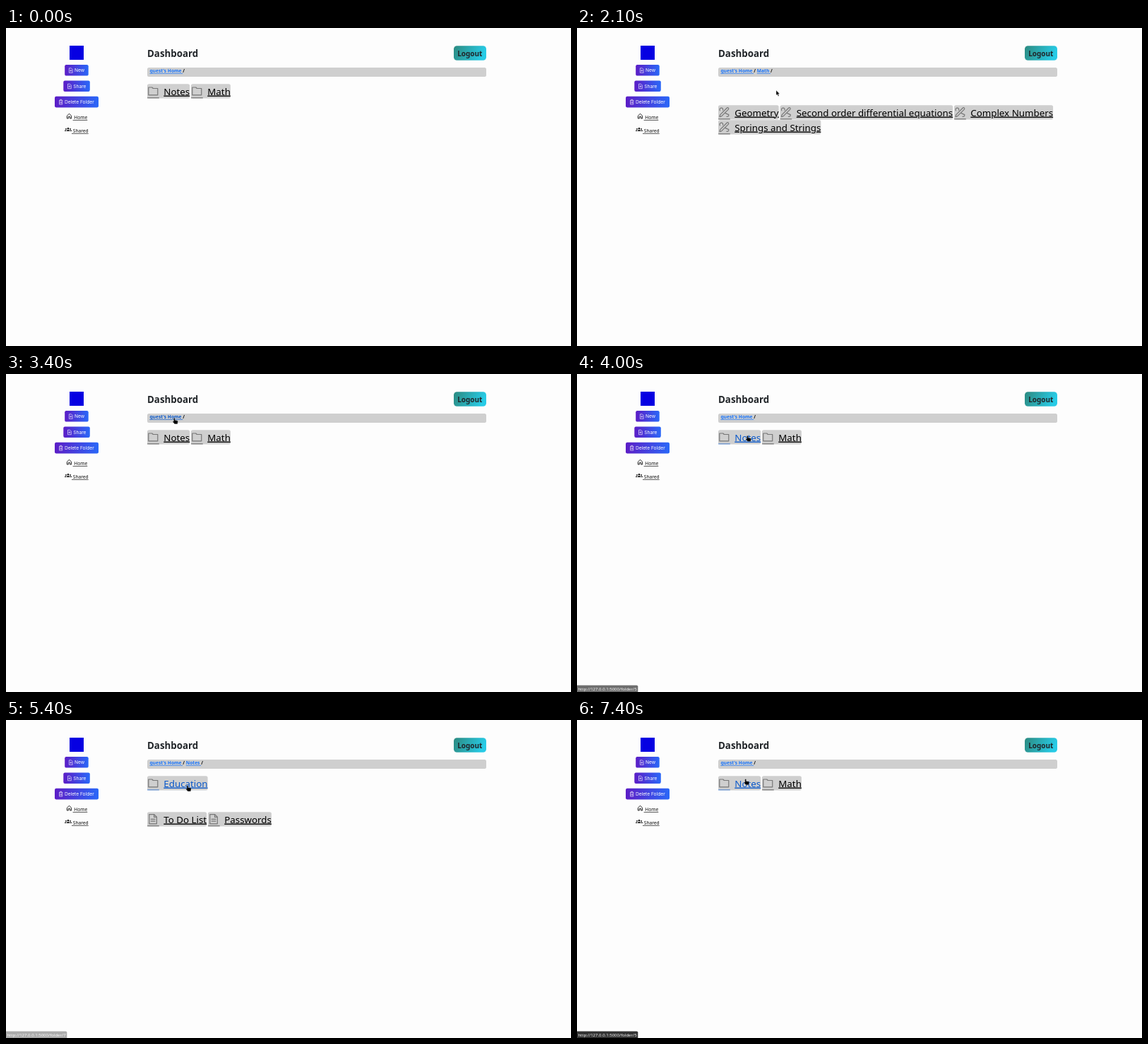
These frames come from a looping animation (800x450 px, 8000 ms). An HTML page:

```html
<!DOCTYPE html>
<html lang="en">
<head>
<meta charset="utf-8">
<title>Dashboard</title>
<style>
  html, body { margin: 0; width: 100%; height: 100%; overflow: hidden; background: #fdfdfd; }
  svg { display: block; width: 100vw; height: 100vh; }
  text { font-family: "Noto Sans", sans-serif; font-size: 6.667px; white-space: pre; fill: #111; }
  .title { font-size: 13.333px; font-weight: 700; fill: #212529; }
  .logout { font-size: 10px; font-weight: 700; fill: #212529; }
  .btn { font-family: Inter, sans-serif; fill: #fff; }
  .crumbs { font-weight: 700; }
  .link { text-decoration: underline; }
  .crumbs .link { fill: #1a75fb; }
  .chip text { font-size: 13.333px; fill: #000; text-decoration: underline; }
  .chip line { stroke: #222; stroke-width: .7; }
  .crumbs .hot { fill: #0a58ca; }
  .chip.hot text { fill: #0a58ca; }
  .chip.hot line { stroke: #0a58ca; }
  .icon { fill: none; stroke: #777; stroke-width: 1.2; stroke-linejoin: round; stroke-linecap: round; }
  .status text { font-size: 6px; fill: #f4f4f4; }
</style>
</head>
<body>
<svg id="stage" viewBox="0 0 800 450">
  <defs>
    <linearGradient id="violet"><stop stop-color="#5c1dc6"/><stop offset="1" stop-color="#2a68f8"/></linearGradient>
    <linearGradient id="teal" x2="1" y2=".2"><stop stop-color="#2c8a80"/><stop offset="1" stop-color="#27cbe6"/></linearGradient>
  </defs>
  <rect width="800" height="450" fill="#fdfdfd"/>
  <rect x="90" y="25" width="20" height="20" fill="#0600e2"/>
  <text class="title" x="200" y="40.7">Dashboard</text>
  <rect x="634" y="25.3" width="46" height="20.4" rx="4.5" fill="url(#teal)"/>
  <text class="logout" x="639.2" y="39.6">Logout</text>
  <g id="buttons"></g>
  <path d="M86.4 124.2 89.5 121.3 92.6 124.2V128H90.6V125.3H88.4V128H86.4Z" fill="none" stroke="#111" stroke-width=".9"/>
  <text class="link" x="94.6" y="129.2"> Home</text>
  <g fill="#111">
    <circle cx="88" cy="142.3" r="1.3"/><circle cx="84.9" cy="143" r=".9"/><circle cx="91.1" cy="143" r=".9"/>
    <path d="M85.6 146V145.4Q85.8 144.2 88 144.2T90.4 145.4V146ZM83 146V145.3Q83.3 144.4 85.2 144.4L84.9 146ZM93 146V145.3Q92.7 144.4 90.8 144.4L91.1 146Z"/>
  </g>
  <text class="link" x="93" y="148.2"> Shared</text>
  <rect x="200" y="56" width="480" height="13" rx="2.5" fill="#cfcfcf"/>
  <g id="pages"></g>
  <g id="status" class="status">
    <path d="M0 440.5H84.5Q86.3 440.5 86.3 442.3V450H0Z" fill="#333"/>
    <text x="1.4" y="447.6"></text>
  </g>
  <path id="arrow" d="M0 0V6.9L1.6 5.5 2.8 8.1 4 7.6 2.9 5H5Z" fill="#000" stroke="#fff" stroke-width=".35"/>
  <path id="hand" d="M-.9.7Q-.8 0 0 0T.9.7V3L4.2 3.6Q5.2 3.9 5.1 4.9L4.5 8.4H.4L-2.3 5.3Q-2.2 4.2-.9 4.8Z" fill="#000" stroke="#fff" stroke-width=".25"/>
</svg>
<script>
const NS = 'http://www.w3.org/2000/svg';
const LOOP = 8000, STEP = 100;
const $ = id => document.getElementById(id);

function add(parent, tag, attrs = {}, text) {
  const el = document.createElementNS(NS, tag);
  for (const k in attrs) el.setAttribute(k, attrs[k]);
  if (text) el.textContent = text;
  return parent.appendChild(el);
}

const ICONS = {
  folder: 'M1.8 4.8H6.8L8.3 6.3H14.8V15.6H1.8Z',
  doc: 'M2.8 3.4H9.8L13.4 7V16.6H2.8ZM9.6 3.6V7.2H13.2M5.3 10.2H10.9M5.3 13H10.9',
  draw: 'M2 16.4 2.6 13.6 12.4 3.8Q13.4 3 14.3 3.9T14.4 5.9L4.6 15.7ZM2.3 7.6Q1.4 4.2 4.2 4T6.6 7M10.2 11.4 14.8 13.4Q15.2 16.4 12 16.2'
};

// Each row: icon, top, labels.
const PAGES = {
  root: { path: [], rows: [['folder', 79.2, ['Notes', 'Math']]] },
  math: { path: ['Math'], rows: [
    ['draw', 109.2, ['Geometry', 'Second order differential equations', 'Complex Numbers']],
    ['draw', 130.2, ['Springs and Strings']]] },
  notes: { path: ['Notes'], rows: [
    ['folder', 79.2, ['Education']],
    ['doc', 130.2, ['To Do List', 'Passwords']]] },
  edu: { path: ['Notes', 'Education'], rows: [['doc', 109.2, ['Data structures', 'Algorithms']]] }
};

function addButton(x, y, w, label, icon) {
  const g = add($('buttons'), 'g', { transform: `translate(${x} ${y})` });
  add(g, 'rect', { width: w, height: 15.6, rx: 2.2, fill: 'url(#violet)' });
  add(g, 'path', { d: icon, fill: 'none', stroke: '#fff', 'stroke-width': .6 });
  add(g, 'text', { class: 'btn', x: 13.9, y: 10.2 }, label);
}

function addChip(parent, x, y, label, icon) {
  const g = add(parent, 'g', { class: 'chip', transform: `translate(${x} ${y})`, 'data-key': label });
  const box = add(g, 'rect', { height: 20.4, rx: 2.5, fill: '#cfcfcf' });
  add(g, 'path', { class: 'icon', d: ICONS[icon] });
  add(g, 'line', { x1: 0, x2: 16.8, y1: 19.7, y2: 19.7 });
  const width = 23.3 + add(g, 'text', { x: 23.3, y: 15.4 }, label).getComputedTextLength();
  box.setAttribute('width', width);
  return x + width + 1.75;
}

function addPage({ path, rows }) {
  const g = add($('pages'), 'g');
  const crumbs = add(g, 'text', { class: 'crumbs', x: 203.4, y: 63.3 });
  ["guest's Home", ...path].forEach((name, i) => {
    add(crumbs, 'tspan', { class: 'link', 'data-key': i ? name : 'home' }, name + ' ');
    add(crumbs, 'tspan', {}, '/ ');
  });
  for (const [icon, y, labels] of rows)
    labels.reduce((x, label) => addChip(g, x, y, label, icon), 200);
  return g;
}

const sheet = 'M6.2 4.8H9.2L11 6.6V11.3H6.2ZM8.6 6.8V9.8M7.2 8.3H10';
addButton(83.2, 52, 33.5, 'New', sheet);
addButton(81.3, 74.4, 37.5, 'Share', sheet);
addButton(69, 96.8, 62, 'Delete Folder', 'M6 5.8H11.4M7.6 5.6V4.5H9.8V5.6M6.6 6V11.3H10.8V6M8 7.3V10M9.4 7.3V10');

const views = {};
for (const name in PAGES) views[name] = addPage(PAGES[name]);

// time, page, hovered link
const SCENES = [
  [0, 'root', ''], [1500, 'root', 'Math'], [1900, 'math', ''], [2400, 'math', 'home'],
  [3400, 'root', 'home'], [3600, 'root', ''], [3700, 'root', 'Notes'], [4200, 'notes', 'Education'],
  [5800, 'edu', ''], [6500, 'edu', 'home'], [6800, 'root', 'home'], [7000, 'root', ''], [7100, 'root', 'Notes']
];

// folder, fade in, fade out, gone
const HINTS = [
  [6, 1500, 1800, 2200], [1, 2400, 3400, 3400], [5, 3700, 4000, 4300],
  [7, 4300, 5300, 5700], [5, 7200, LOOP, LOOP]
];

// time, x, y
const TRACK = [
  [1500, 300, 97], [1700, 288, 91], [1900, 286, 90], [2100, 282, 88.3], [2300, 263, 73],
  [2400, 246, 64], [2800, 238.3, 62.3], [3400, 238.3, 62.3], [3600, 238, 72], [3700, 239, 83],
  [4200, 243, 90], [4400, 250.3, 91.2], [4700, 253, 93.5], [5100, 258, 91], [5400, 257, 92.5],
  [5900, 257, 92.5], [6000, 265, 76], [6100, 262, 52], [6200, 241, 51], [6300, 232.6, 57.2],
  [6400, 232.6, 57.2], [6600, 236, 61], [6700, 236, 61], [7100, 238, 79], [7400, 238.7, 83.4], [LOOP, 238.7, 83.4]
];

const clamp = v => Math.max(0, Math.min(1, v));

function pointAt(t) {
  const i = TRACK.findIndex(p => p[0] > t);
  const [t0, x0, y0] = TRACK[i - 1], [t1, x1, y1] = TRACK[i];
  const k = (t - t0) / (t1 - t0);
  return [x0 + (x1 - x0) * k, y0 + (y1 - y0) * k];
}

function drawHint(t) {
  const hint = HINTS.find(([, from, , end]) => t >= from && t < end);
  let alpha = 0;
  if (hint) {
    const [folder, from, off] = hint;
    alpha = t < off ? clamp((t - from + STEP) * .004) : clamp(1 - (t - off + STEP) * .003);
    $('status').lastElementChild.textContent = `http://127.0.0.1:5000/folder/${folder}`;
  }
  $('status').setAttribute('opacity', alpha);
}

function render(ms) {
  const t = Math.floor(ms % LOOP / STEP) * STEP;
  const [, page, hover] = SCENES.filter(s => s[0] <= t).pop();
  for (const name in views) views[name].style.display = name === page ? '' : 'none';
  views[page].querySelectorAll('[data-key]').forEach(el =>
    el.classList.toggle('hot', el.dataset.key === hover));
  drawHint(t);

  const visible = t >= TRACK[0][0];
  $('arrow').style.display = visible && !hover ? '' : 'none';
  $('hand').style.display = visible && hover ? '' : 'none';
  if (visible) {
    const [x, y] = pointAt(t);
    for (const id of ['arrow', 'hand']) $(id).setAttribute('transform', `translate(${x} ${y})`);
  }
}

const start = performance.now();
function tick() {
  render(performance.now() - start);
  requestAnimationFrame(tick);
}
tick();
</script>
</body>
</html>
```
